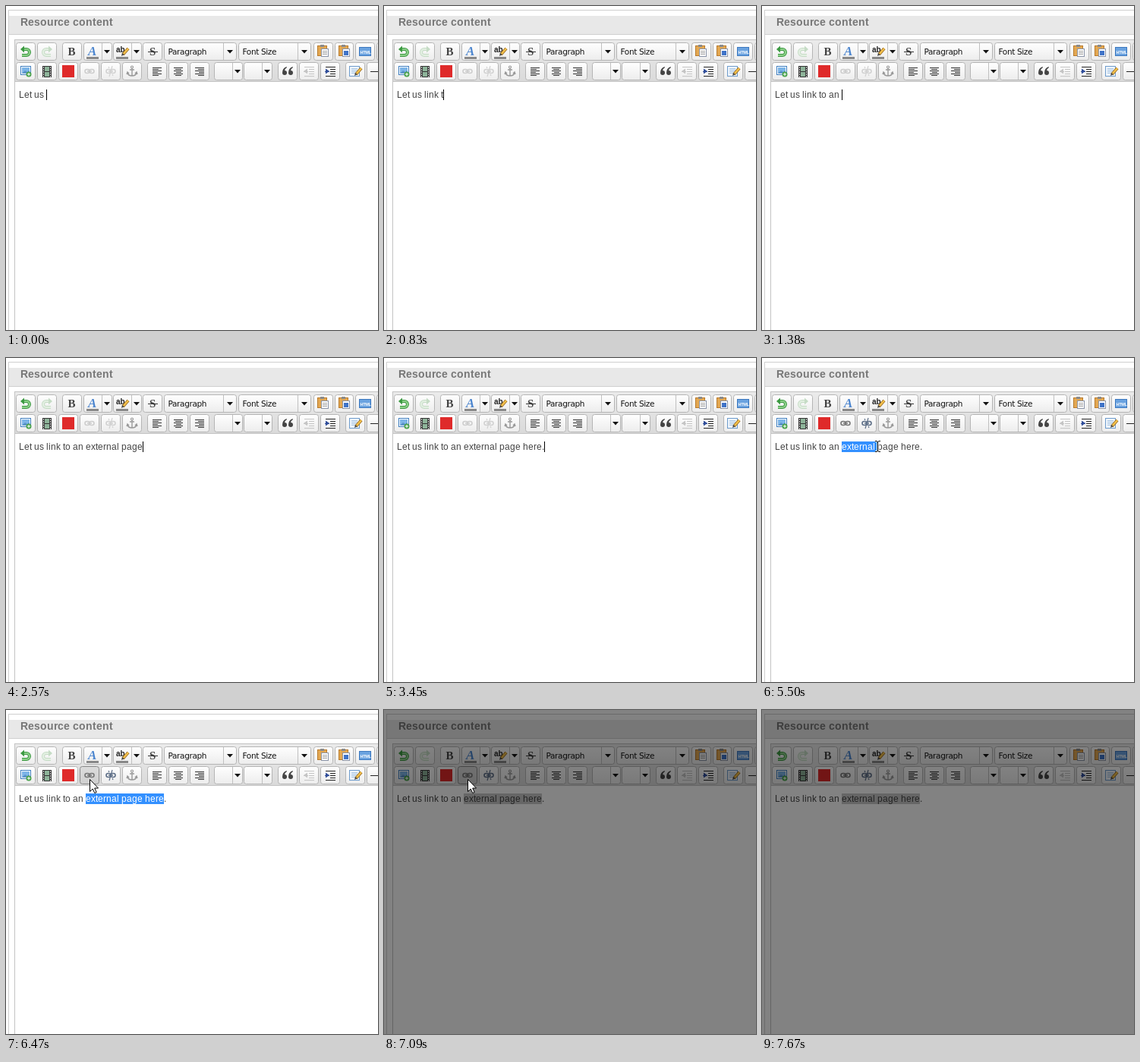
Recreate the animation shown at these times as an HTML page with a canvas. Size 490 px wide and 427 px high, loop 8000 ms.

```html
<!DOCTYPE html>
<html lang="en">
<head>
<meta charset="utf-8">
<title>Linking to a page</title>
<style>
html, body { margin: 0; width: 490px; height: 427px; overflow: hidden; background: #fff; }
canvas { display: block; }
</style>
</head>
<body>
<canvas id="stage" width="490" height="427"></canvas>
<script>
const c = document.getElementById('stage').getContext('2d');
const LOOP = 8000;
const SENTENCE = 'Let us link to an external page here.';
const BODY = '12px "Liberation Sans", Arial, sans-serif';
const SERIF = '"Liberation Serif", Times, serif';
const SEL_START = 18, SEL_END = 36;

// [time, characters typed]
const typing = [[0, 7], [150, 8], [410, 10], [550, 12],
  [830, 13], [970, 14], [1110, 15], [1240, 16], [1380, 18], [1520, 19], [1660, 21], [1800, 22],
  [1940, 23], [2070, 24], [2190, 26], [2320, 28], [2440, 29], [2570, 31],
  [3000, 32], [3150, 34], [3300, 36], [3450, 37]];

// [time, pointer, x, y]
const pointer = [[0, ''],
  [4010, 'beam', 309, 218], [4150, 'beam', 238, 168], [4290, 'beam', 178, 134], [4430, 'beam', 142, 119],
  [4580, 'beam', 125, 115], [4730, 'beam', 114, 109], [4870, 'beam', 108, 112], [5000, 'beam', 108, 116],
  [5120, 'beam', 113, 116], [5250, 'beam', 130, 116], [5390, 'beam', 152, 116], [5520, 'beam', 175, 116],
  [5650, 'beam', 194, 116], [5790, 'beam', 205, 116], [5920, 'beam', 186, 113], [6050, 'arrow', 153, 96],
  [6200, 'arrow', 135, 92], [6330, 'arrow', 118, 90], [6470, 'arrow', 110, 91],
  [7400, 'arrow', 250, 65], [7535, 'arrow', 387, 41], [7670, '']];

const at = (keys, t) => keys.findLast(k => k[0] <= t);

function box(x, y, w, h, color) {
  c.fillStyle = color;
  c.fillRect(x, y, w, h);
}
function fill(d, color) {
  c.fillStyle = color;
  c.fill(new Path2D(d));
}
function line(d, color, width = 1) {
  c.strokeStyle = color;
  c.lineWidth = width;
  c.stroke(new Path2D(d));
}
function text(s, x, y, font, color, spacing = 0) {
  c.font = font;
  c.fillStyle = color;
  c.letterSpacing = spacing + 'px';
  c.fillText(s, x, y);
  c.letterSpacing = '0px';
}
function width(s, font) {
  c.font = font;
  return [...s].reduce((sum, ch) => sum + Math.round(c.measureText(ch).width), 0);
}
// Text with whole-pixel advances
function snapped(s, x, y, font, color) {
  for (const ch of s) {
    text(ch, x, y, font, color);
    x += width(ch, font);
  }
}
function at0(x, y, draw) {
  c.save();
  c.translate(x, y);
  draw();
  c.restore();
}

function button(x, y, w, split, hover) {
  const g = c.createLinearGradient(0, y, 0, y + 24);
  g.addColorStop(0, hover ? '#dcdcdc' : '#ffffff');
  g.addColorStop(1, hover ? '#cfcfcf' : '#ececec');
  c.beginPath();
  c.roundRect(x + .5, y + .5, w - 1, 23, 3);
  c.fillStyle = g;
  c.fill();
  c.strokeStyle = hover ? '#888' : '#b5b5b5';
  c.lineWidth = 1;
  c.stroke();
  if (split) {
    line(`M${x + split + .5} ${y + 1}v22`, '#c0c0c0');
    const m = x + (split + w) / 2;
    fill(`M${m - 4} ${y + 10}h8l-4 4.5z`, '#111');
  }
}

function turnArrow(color, edge) {
  const d = 'M-5 5H1A4 4 0 0 0 1 -3H-3';
  line(d, edge, 4);
  line(d, color, 2.2);
  fill('M-7 -3L-2 -7.5V1.5z', edge);
}
function clipboard() {
  box(-8, -7, 13, 14, '#b87a2c');
  box(-7, -6, 11, 12, '#e3a852');
  box(-4, -8, 5, 3, '#8b8b8b');
  box(-3, -3, 10, 11, '#8a94a8');
  box(-2, -2, 8, 9, '#fff');
}
function chain(color, broken) {
  c.strokeStyle = color;
  c.lineWidth = 1.6;
  for (const x of [-6, 0]) {
    c.beginPath();
    c.roundRect(x, -2.5, 6, 5, 2.5);
    c.stroke();
  }
  line('M-3 0H3', color, 1.5);
  if (broken) line('M2 -7L-2 7M-3 -6l1 2M3 6l-1 -2', color, 1.2);
}
function rows(widths, align, color = '#333') {
  widths.forEach((w, i) => box(Math.round(-6 + (12 - w) * align), -5 + i * 2, w, 1, color));
}
function indent(color, arrow, dir) {
  [-6, -3, 0, 3, 6].forEach((y, i) => box(i % 4 ? 0 : -6, y, i % 4 ? 7 : 13, 1, color));
  fill(`M${-4 + dir * 3} 0L${-4 - dir * 2} -3.5V3.5z`, arrow);
  line('M-7 .5H-1', arrow, 1);
}
function pencil() {
  line('M-1 4L6 -4', '#9a6a20', 4);
  line('M-1 4L6 -4', '#f3c14b', 2.4);
  fill('M-3 6l1 -4 3 2z', '#444');
}

function toolbar(active, hover) {
  const g = c.createLinearGradient(0, 45, 0, 99);
  g.addColorStop(0, '#ebebeb');
  g.addColorStop(1, '#dadada');
  box(11, 44, 479, 56, '#c3c3c3');
  box(12, 45, 478, 54, g);

  [[13, 26], [41, 26], [74, 26], [102, 38, 24], [141, 38, 24], [180, 26], [208, 96, 78], [306, 96, 78],
    [405, 26], [433, 25], [460, 26], [488, 26]].forEach(([x, w, s]) => button(x, 48, w, s));
  [[13, 26], [41, 26], [69, 26], [97, 26], [125, 26], [153, 26], [186, 26], [214, 26], [242, 26],
    [274, 38, 24], [313, 38, 24], [358, 26], [386, 26], [414, 26], [447, 26], [475, 26]]
    .forEach(([x, w, s]) => button(x, 74, w, s, hover && x === 97));

  // First row
  at0(26, 60, () => turnArrow('#8ed08a', '#3c9a42'));
  at0(54, 60, () => { c.scale(-1, 1); turnArrow('#e4f0e3', '#c5dcc5'); });
  text('B', 81.5, 65, `bold 15px ${SERIF}`, '#444');
  text('A', 108, 65, `italic bold 17px ${SERIF}`, '#4d86cf');
  box(106, 67, 16, 3, '#888');
  text('ab', 145, 61, 'bold 10px "Liberation Sans", Arial, sans-serif', '#222');
  at0(155, 60, pencil);
  box(145, 67, 16, 3, '#888');
  text('S', 189, 65, `bold 15px ${SERIF}`, '#444');
  box(187, 60, 13, 1, '#333');
  const label = '10.5px "DejaVu Sans", Verdana, sans-serif';
  text('Paragraph', 213.5, 64, label, '#111', -.35);
  text('Font Size', 311.5, 64, label, '#111', -.35);
  at0(418, 59, () => {
    clipboard();
    for (const y of [0, 2, 4]) box(-1, y, 6, 1, '#a5a5a5');
  });
  at0(446, 59, () => {
    clipboard();
    box(-1, 0, 6, 6, '#3f73c8');
  });
  box(465, 54, 16, 12, '#3c78bf');
  box(466, 55, 14, 10, '#6ba3e0');
  text('HTML', 466.5, 63, 'bold 5.5px "Liberation Sans", Arial, sans-serif', '#fff', -.3);

  // Second row
  at0(26, 86, () => {
    box(-7, -7, 14, 12, '#3f7fc1');
    box(-6, -6, 12, 10, '#fff');
    box(-5, -5, 10, 8, '#7db5e8');
    fill('M-5 3L-1 -1 2 1 5 -1V3z', '#5b93c9');
    c.beginPath();
    c.arc(4, 4, 3.5, 0, 7);
    c.fillStyle = '#4ba34d';
    c.fill();
    line('M2 4H6M4 2V6', '#fff');
  });
  at0(54, 86, () => {
    box(-6, -7, 12, 15, '#333');
    box(-3, -6, 6, 6, '#8eb49a');
    box(-3, 1, 6, 6, '#8eb49a');
    for (let y = -6; y < 8; y += 3) {
      box(-5, y, 1, 2, '#ddd');
      box(4, y, 1, 2, '#ddd');
    }
  });
  box(74, 78, 16, 16, '#df2a2a');
  at0(110, 86, () => chain(active ? '#777' : '#cecece'));
  at0(138, 86, () => chain(active ? '#5f7088' : '#d2d2d2', true));
  at0(166, 86, () => {
    line('M0 -4V6M-3 -2H3M-6 2Q-5 6 0 6Q5 6 6 2M-7 4l1 -3 2 2M7 4l-1 -3 -2 2', '#999', 1.4);
    line('M-1.5 -5.5a1.5 1.5 0 1 0 3 0a1.5 1.5 0 1 0 -3 0', '#999', 1.2);
  });
  const widths = [12, 8, 12, 7, 12, 8];
  [0, .5, 1].forEach((align, i) => at0(199 + 28 * i, 86, () => rows(widths, align)));
  for (const x of [364, 372])
    fill(`M${x + 5.5} 80Q${x} 82 ${x} 88a3 3 0 1 0 3 -3Q${x + 3} 83 ${x + 6} 81z`, '#444');
  at0(399, 86, () => indent('#c4c4c4', '#c4c4c4', -1));
  at0(427, 86, () => indent('#222', '#2f4d9a', 1));
  at0(460, 86, () => {
    box(-8, -7, 14, 14, '#6f9ccc');
    box(-7, -6, 12, 12, '#eef5fc');
    for (const y of [-4, -2, 0, 2]) box(-5, y, 8, 1, '#a9c5e2');
    at0(2, 0, pencil);
  });
  box(480, 86, 10, 1, '#222');
}

function page(t) {
  const dim = t >= 7090;
  const [, kind, px, py] = at(pointer, t);
  box(0, 0, 490, 427, '#fff');
  box(3, 5, 487, 1, '#cfcfcf');
  box(3, 5, 1, 422, '#cfcfcf');
  box(4, 13, 486, 24, '#e8e8e8');
  box(4, 37, 486, 1, '#cfcfcf');
  snapped('Resource content', 19, 26, 'bold 14px "Liberation Sans", Arial, sans-serif', '#777');
  box(11, 44, 1, 383, '#c3c3c3');
  toolbar(t >= 5120, t >= 6330 && t < 7400);

  const typed = SENTENCE.slice(0, at(typing, t)[1]);
  snapped(typed, 17, 121, BODY, '#444');
  if (t < 4010) box(17 + width(typed, BODY), 110, 1, 14, '#000');

  if (t >= 5120) {
    const x = 17 + width(SENTENCE.slice(0, SEL_START), BODY);
    let end = SEL_END;
    if (t < 5790) {
      end = SEL_START;
      while (end < SEL_END && 17 + width(SENTENCE.slice(0, end + 1), BODY) <= px + 3) end++;
    }
    const part = SENTENCE.slice(SEL_START, end);
    box(x, 110, width(part, BODY), 14, dim ? '#c8c8c8' : '#3390ff');
    snapped(part, x, 121, BODY, dim ? '#444' : '#fff');
  }
  if (dim) box(0, 0, 490, 427, 'rgba(0,0,0,.49)');

  if (kind === 'beam') at0(px, py, () => {
    const d = 'M-3 -6.5H-1L.5 -5.5 2 -6.5H4M.5 -6V7M-3 7.5H-1L.5 6.5 2 7.5H4';
    line(d, '#fff', 2.6);
    line(d, '#000', 1);
  });
  if (kind === 'arrow') at0(px, py, () => {
    const d = 'M.5 .5V16.5L4.2 13 6.8 18.5 9.2 17.4 6.7 12H11.5z';
    fill(d, '#fff');
    line(d, '#000');
  });
}

function frame(now) {
  page(now % LOOP);
  requestAnimationFrame(frame);
}
requestAnimationFrame(frame);
</script>
</body>
</html>
```
